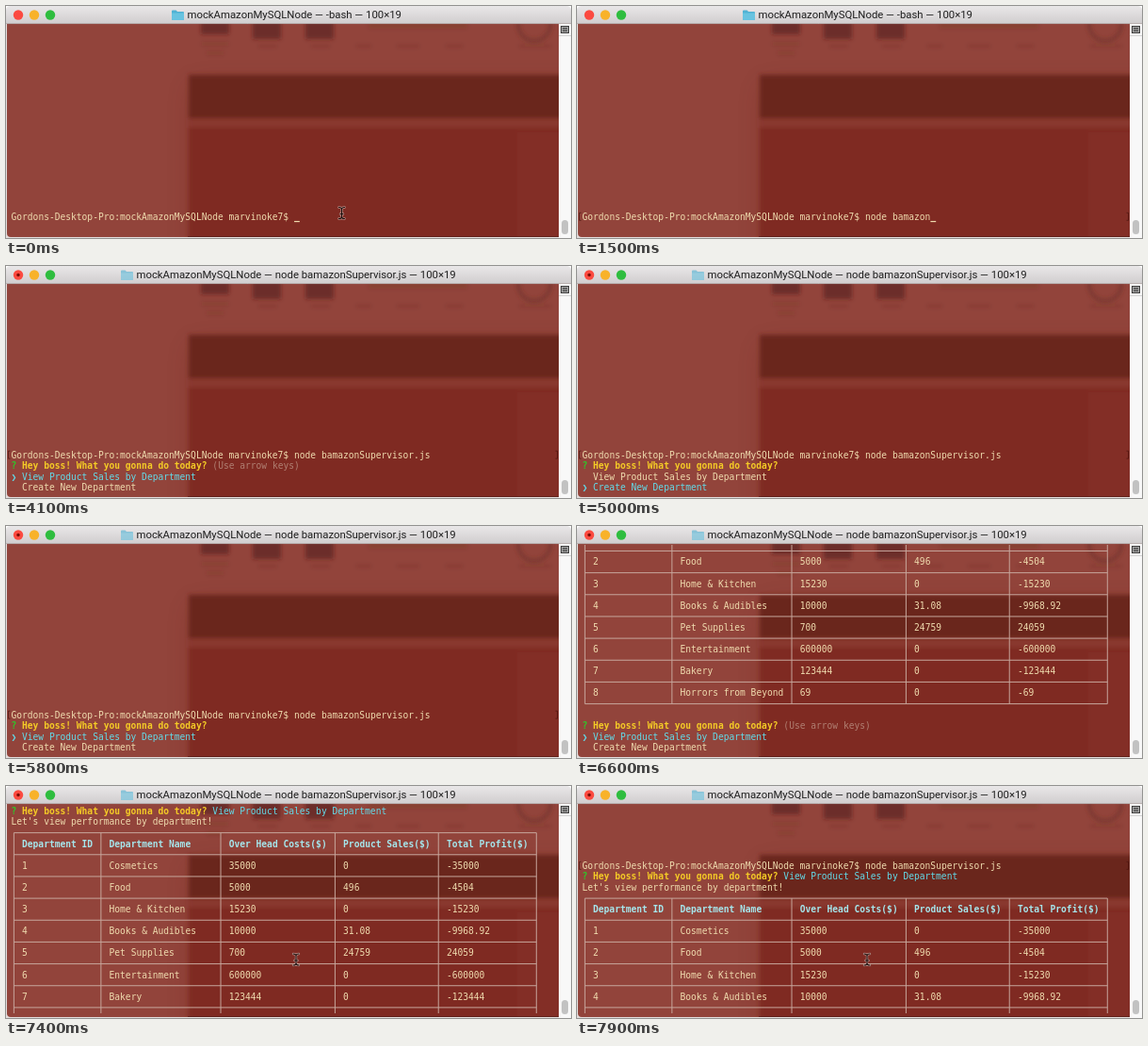
Write an HTML page that moves like this. It is 600x246 px and loops after 8 s.

```html
<!DOCTYPE html>
<html lang="en">
<head>
<meta charset="utf-8">
<title>Terminal session</title>
<style>
  html, body { margin: 0; width: 100%; height: 100%; overflow: hidden; background: #fff; }
  svg { display: block; width: 600px; height: 246px; }
  text { white-space: pre; }
  #screen text { font: 9.6px "DejaVu Sans Mono", monospace; }
  #screen text.bold { font-weight: bold; }
  #title { font: 11.35px Roboto, sans-serif; fill: #1e1e1e; }
</style>
</head>
<body>
<svg viewBox="0 0 600 246">
  <defs>
    <linearGradient id="bar" x2="0" y2="1">
      <stop offset="0" stop-color="#e9e7e8"/><stop offset="1" stop-color="#d0cdce"/>
    </linearGradient>
    <filter id="soft" x="-30%" y="-30%" width="160%" height="160%"><feGaussianBlur stdDeviation="2"/></filter>
    <filter id="shade" x="-30%" y="-50%" width="160%" height="200%"><feGaussianBlur stdDeviation="14"/></filter>
    <clipPath id="pane"><path d="M1 19H587V245H5Q1 245 1 241Z"/></clipPath>
    <clipPath id="rows"><rect x="1" y="20" width="586" height="221"/></clipPath>
  </defs>

  <!-- blurred desktop behind the translucent window -->
  <rect y="19" width="600" height="227" fill="#e2dddc"/>
  <g clip-path="url(#pane)">
    <rect y="19" width="600" height="230" fill="#92443b"/>
    <rect x="198" y="84" width="480" height="240" fill="#5c1710" opacity=".2" filter="url(#shade)"/>
    <g filter="url(#soft)" fill="#52211d">
      <g opacity=".6">
        <rect x="207" y="10" width="30" height="20"/>
        <rect x="262" y="10" width="30" height="25"/>
        <rect x="318" y="10" width="30" height="25"/>
      </g>
      <g opacity=".16">
        <rect x="208" y="38" width="28" height="4"/><rect x="213" y="48" width="18" height="4"/>
        <rect x="268" y="41" width="20" height="3"/><rect x="324" y="41" width="20" height="3"/>
        <rect x="372" y="41" width="16" height="3"/><rect x="415" y="41" width="24" height="3"/>
        <rect x="467" y="41" width="18" height="3"/><rect x="545" y="41" width="34" height="3"/>
        <rect x="385" y="16" width="105" height="8"/>
      </g>
      <circle cx="561" cy="20" r="17" fill="none" stroke="#6b2f29" stroke-width="4" opacity=".55"/>
    </g>
    <g filter="url(#soft)">
      <rect x="194" y="73" width="420" height="200" fill="#7f2b22"/>
      <rect x="194" y="73" width="420" height="46" fill="#6a261e"/>
      <rect x="194" y="119" width="420" height="10" fill="#89382f"/>
      <rect x="543" y="134" width="70" height="130" fill="#832e25"/>
    </g>
    <rect x="193" y="244" width="394" height="1" fill="#551b15" opacity=".7"/>
  </g>

  <g id="screen" clip-path="url(#rows)"><g id="doc"></g></g>

  <!-- window frame -->
  <rect x="587" y="19" width="13" height="227" fill="#f8f8f8"/>
  <path d="M587 31.5H600" stroke="#d4d4d4"/>
  <rect x="589.5" y="21.5" width="8" height="7" fill="#a8a8a8" stroke="#3a3a3a"/>
  <path d="M591 23.5h5M591 25h5M591 26.5h5" stroke="#3a3a3a" stroke-width=".8"/>
  <rect x="590" y="227" width="7" height="15" rx="3.5" fill="#c2c2c2"/>
  <path d="M0 19V5Q0 0 5 0H595Q600 0 600 5V19Z" fill="url(#bar)"/>
  <path d="M0 18.6H600" stroke="#b0a5a4" stroke-width=".8"/>
  <circle cx="13" cy="9.5" r="5.2" fill="#fb4a40"/>
  <circle cx="30" cy="9.5" r="5.2" fill="#f8b229"/>
  <circle cx="47" cy="9.5" r="5.2" fill="#2fbd3f"/>
  <circle id="busy" cx="13" cy="9.5" r="1.7" fill="#7a0c06"/>
  <g id="folder">
    <path d="M0 1.5Q0 .5 1 .5H4.6L6 2H12Q13 2 13 3V10Q13 11 12 11H1Q0 11 0 10Z" fill="#4fb2d4"/>
    <path d="M0 3.6H13V10Q13 11 12 11H1Q0 11 0 10Z" fill="#68c3e0"/>
  </g>
  <text id="title" y="13.4"></text>

  <g id="beam" fill="none" stroke-linecap="round">
    <path d="M-3-6Q0-6 0-4Q0-6 3-6M0-4V4M-3 6Q0 6 0 4Q0 6 3 6M-1.5 1H1.5" stroke="#d8bdb8" stroke-width="2.4" opacity=".7"/>
    <path d="M-3-6Q0-6 0-4Q0-6 3-6M0-4V4M-3 6Q0 6 0 4Q0 6 3 6M-1.5 1H1.5" stroke="#1c0d0b" stroke-width="1.1"/>
  </g>
</svg>
<script>
const LOOP = 8000, LEFT = 5.5, CELL = 5.78, LINE = 11.58, LAST_ROW = 234.9;
const SAND = '#efdbae', CYAN = '#62dbe9', PALE = '#a5e6ec', GOLD = '#f4cb26',
      GREEN = '#2fc52a', DIM = '#b07f72', RULE = '#c7a69c', MARK = '#4a1611';
const PROMPT = 'Gordons-Desktop-Pro:mockAmazonMySQLNode marvinoke7$ ';
const QUESTION = 'Hey boss! What you gonna do today?';
const CHOICES = ['View Product Sales by Department', 'Create New Department'];
const HINT = '(Use arrow keys)';
const TABLE = [
  ['Department ID', 'Department Name', 'Over Head Costs($)', 'Product Sales($)', 'Total Profit($)'],
  ['1', 'Cosmetics', '35000', '0', '-35000'],
  ['2', 'Food', '5000', '496', '-4504'],
  ['3', 'Home & Kitchen', '15230', '0', '-15230'],
  ['4', 'Books & Audibles', '10000', '31.08', '-9968.92'],
  ['5', 'Pet Supplies', '700', '24759', '24059'],
  ['6', 'Entertainment', '600000', '0', '-600000'],
  ['7', 'Bakery', '123444', '0', '-123444'],
  ['8', 'Horrors from Beyond', '69', '0', '-69']
];
const EDGES = [0, 16, 38, 59, 78, 96];
const KEYS = [[500, 'n'], [600, 'o'], [700, 'd'], [800, 'e'], [900, ' '], [1100, 'b'], [1200, 'a'],
              [1400, 'mazon'], [2500, 'S'], [2900, 'upervisor.js ']];
const RUN = 3800, MENU = 4000, DOWN = 5000, UP = 5500, REPORT = 6400, SCROLL = 6900;

const $ = id => document.getElementById(id);
const el = (tag, attrs, parent, content = '') => {
  const node = document.createElementNS('http://www.w3.org/2000/svg', tag);
  for (const name in attrs) node.setAttribute(name, attrs[name]);
  node.textContent = content;
  return parent.appendChild(node);
};
const group = () => el('g', {}, $('doc'));
const colX = col => LEFT + col * CELL;
const put = (parent, row, col, str, fill, bold) =>
  el('text', { x: colX(col), y: row * LINE + 3.4, fill, class: bold ? 'bold' : '' }, parent, str);
const show = (node, on) => node.setAttribute('display', on ? 'inline' : 'none');
const place = (node, x, y) => node.setAttribute('transform', `translate(${x} ${y})`);

function ask(parent, row) {
  put(parent, row, 0, '?', GREEN, true);
  put(parent, row, 2, QUESTION, GOLD, true);
}
function choose(parent, row, selected) {
  CHOICES.forEach((choice, i) => {
    if (i === selected) put(parent, row + i, 0, '❯', CYAN, true);
    put(parent, row + i, 2, choice, i === selected ? CYAN : SAND);
  });
}
function drawTable(parent, top) {
  const edgeX = EDGES.map(col => colX(col + .5));
  const [x0, x1] = [edgeX[0], edgeX[edgeX.length - 1]];
  const y0 = top * LINE, y1 = (top + TABLE.length * 2) * LINE;
  let d = edgeX.map(x => `M${x} ${y0}V${y1}`).join('');
  for (let i = 0; i <= TABLE.length; i++) d += `M${x0} ${(top + 2 * i) * LINE}H${x1}`;
  el('path', { d, stroke: RULE, 'stroke-width': 1, fill: 'none' }, parent);
  TABLE.forEach((cells, r) => cells.forEach((cell, c) =>
    put(parent, top + 1 + 2 * r, EDGES[c] + 2, cell, r ? SAND : PALE, !r)));
}

put($('doc'), 0, 0, PROMPT, SAND);
const typed = put($('doc'), 0, PROMPT.length, '', SAND);
const caret = el('rect', { width: CELL, height: 1.2, fill: SAND }, $('doc'));
const marks = el('path', {
  d: 'M4.5-4H2.5V4H4.5M583.5-4H585.5V4H583.5', stroke: MARK, opacity: .7, fill: 'none'
}, $('doc'));

const question = group();
ask(question, 1);
const hint = put(question, 1, 37, HINT, DIM);
const answer = put(question, 1, 37, CHOICES[0], CYAN);
const menus = CHOICES.map((_, i) => {
  const menu = group();
  choose(menu, 2, i);
  return menu;
});

const report = group();
put(report, 2, 0, "Let's view performance by department!", SAND);
drawTable(report, 3);
ask(report, 23);
put(report, 23, 37, HINT, DIM);
choose(report, 24, 0);

function scrolledLines(t) {
  if (t < SCROLL) return 0;
  return Math.round(t < 7200 ? (t - SCROLL) / 75 : Math.min(12, 4 + (t - 7200) / 85));
}

function setTitle(running) {
  const x = running ? 122 : 176;
  place($('folder'), x, 4);
  $('folder').setAttribute('opacity', running ? .6 : 1);
  show($('busy'), running);
  $('title').setAttribute('x', x + 16.5);
  $('title').textContent =
    `mockAmazonMySQLNode — ${running ? 'node bamazonSupervisor.js' : '-bash'} — 100×19`;
}

function draw(t) {
  const command = KEYS.filter(([at]) => t >= at).map(([, keys]) => keys).join('');
  const running = t >= RUN, asking = t >= MENU, done = t >= REPORT;
  typed.textContent = command;
  show(caret, !asking);
  caret.setAttribute('x', colX(running ? 0 : PROMPT.length + command.length));
  caret.setAttribute('y', (running ? LINE : 0) + 4.6);
  show(marks, t >= KEYS[0][0]);

  const selected = t >= DOWN && t < UP ? 1 : 0;
  show(question, asking);
  show(hint, t < DOWN);
  show(answer, done);
  menus.forEach((menu, i) => show(menu, asking && !done && i === selected));
  show(report, done);

  const lastLine = done ? 25 - scrolledLines(t) : asking ? 3 : 1;
  place($('doc'), 0, LAST_ROW - lastLine * LINE);
  setTitle(running);

  const scrolling = t >= SCROLL - 200;
  show($('beam'), t < KEYS[0][0] || scrolling);
  place($('beam'), scrolling ? 308 : 356.5, scrolling ? 184 : 219.5);
}

const start = performance.now();
function tick() {
  draw((performance.now() - start) % LOOP);
  requestAnimationFrame(tick);
}
tick();
</script>
</body>
</html>
```
